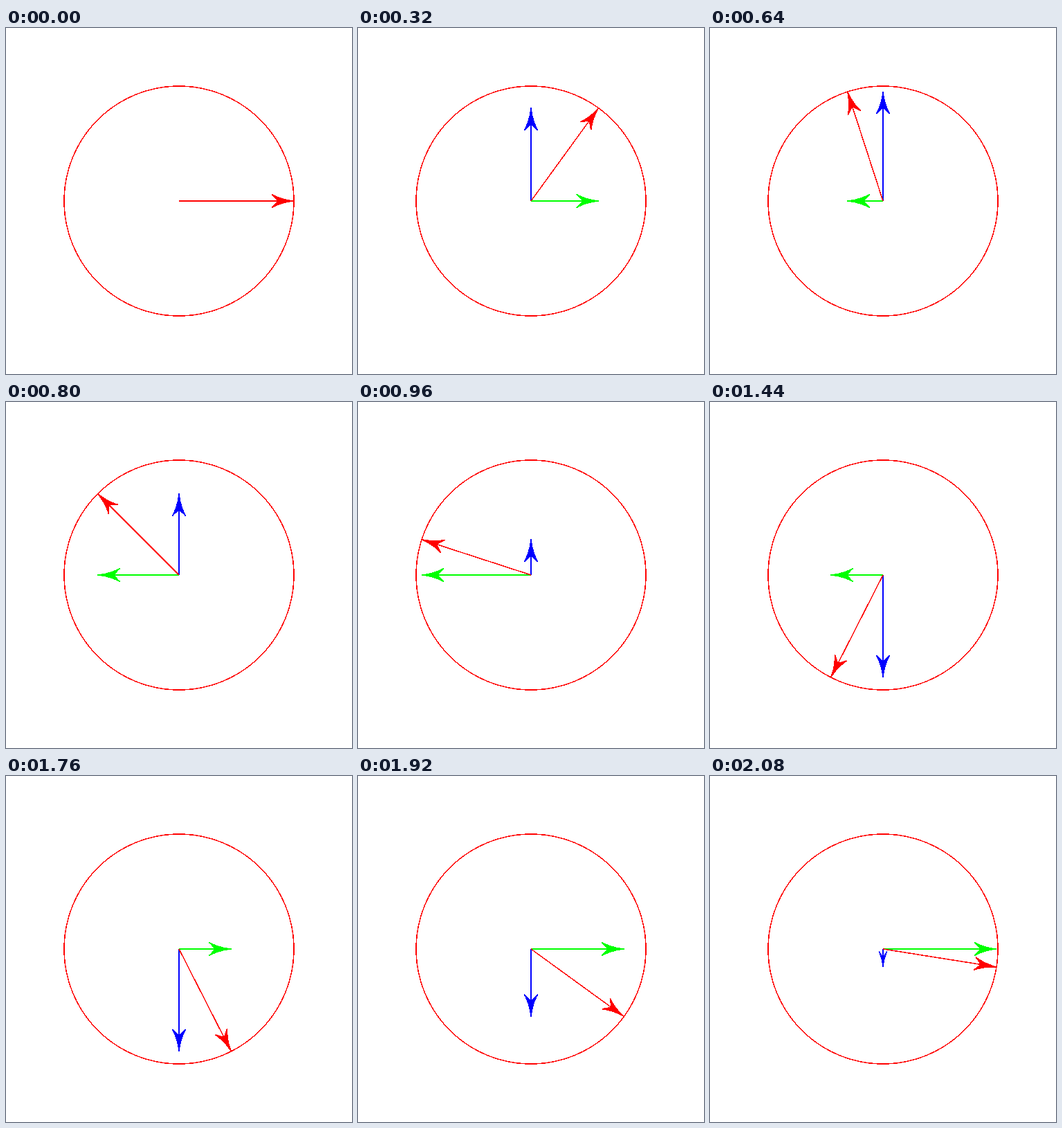
Write a matplotlib script that moves like this. It is 500x500 px and loops after 2240 ms.

```python
import numpy as np
import matplotlib.pyplot as plt
from matplotlib.animation import FuncAnimation
from matplotlib.patches import Circle, PathPatch
from matplotlib.path import Path

SIZE, DPI = 500, 100
CENTER, RADIUS = 250, 166
FRAMES, INTERVAL, STEP = 14, 160, np.radians(27)
STROKE = 1.5
HEAD, BARB = 22.5, 9          # head length up to the notch, extra barb length
HEAD_ANGLE, TIP_ANGLE = np.radians(22.5), np.radians(5)


def harden(img, dpi):
    """Hard pixel edges: keep only pixels that are at least half covered."""
    img = np.array(img)
    img[..., 3] = img[..., 3] > 0.5
    return img, 0, 0


fig = plt.figure(figsize=(SIZE / DPI, SIZE / DPI), dpi=DPI, facecolor="white")
ax = fig.add_axes([0, 0, 1, 1])
ax.set(xlim=(0, SIZE), ylim=(0, SIZE))
ax.axis("off")

STYLE = dict(linewidth=STROKE * 72 / DPI, snap=False, agg_filter=harden,
             capstyle="round", joinstyle="round")


def polar(length, angle):
    return length * np.array([np.cos(angle), np.sin(angle)])


def arrow_path(dx, dy):
    """Shaft plus hooked head from the centre to (dx, dy)."""
    length = np.hypot(dx, dy)
    if length < 1e-6:
        return Path(np.empty((0, 2)))
    head = min(HEAD, length / 2)

    # One side of the head, measured backwards from the tip.
    barb = np.array([head + BARB, head * np.tan(HEAD_ANGLE)])
    chord, slope = np.hypot(*barb), np.arctan2(barb[1], barb[0])
    bend = slope - TIP_ANGLE
    handle = chord * 2 / (3 * (1 + np.cos(bend)))
    c1 = polar(handle, TIP_ANGLE)
    c2 = barb - polar(handle, slope + bend)

    flip = np.array([1, -1])
    pts = np.array([(length, 0), (head, 0),
                    (0, 0), c1, c2, barb, (head, 0),
                    barb * flip, c2 * flip, c1 * flip, (0, 0), (0, 0)])
    codes = [Path.MOVETO, Path.LINETO,
             Path.MOVETO] + [Path.CURVE4] * 3 + [Path.LINETO] * 2 \
        + [Path.CURVE4] * 3 + [Path.CLOSEPOLY]

    u = np.array([dx, dy]) / length
    side = np.array([-u[1], u[0]])
    along = length - pts[:, :1]
    return Path(CENTER + along * u + pts[:, 1:] * side, codes)


def add_arrow(color):
    patch = PathPatch(arrow_path(1, 0), facecolor=color, edgecolor=color, **STYLE)
    return ax.add_patch(patch)


ax.add_patch(Circle((CENTER, CENTER), RADIUS, fill=False, edgecolor="#ff0000", **STYLE))
cos_arrow, sin_arrow, radius_arrow = map(add_arrow, ("#00ff00", "#0000ff", "#ff0000"))


def update(frame):
    x, y = polar(RADIUS, frame * STEP)
    cos_arrow.set_path(arrow_path(x, 0))
    sin_arrow.set_path(arrow_path(0, y))
    radius_arrow.set_path(arrow_path(x, y))
    return cos_arrow, sin_arrow, radius_arrow


anim = FuncAnimation(fig, update, frames=FRAMES, init_func=lambda: update(0),
                     interval=INTERVAL, repeat=True, repeat_delay=0)
plt.show()
```
